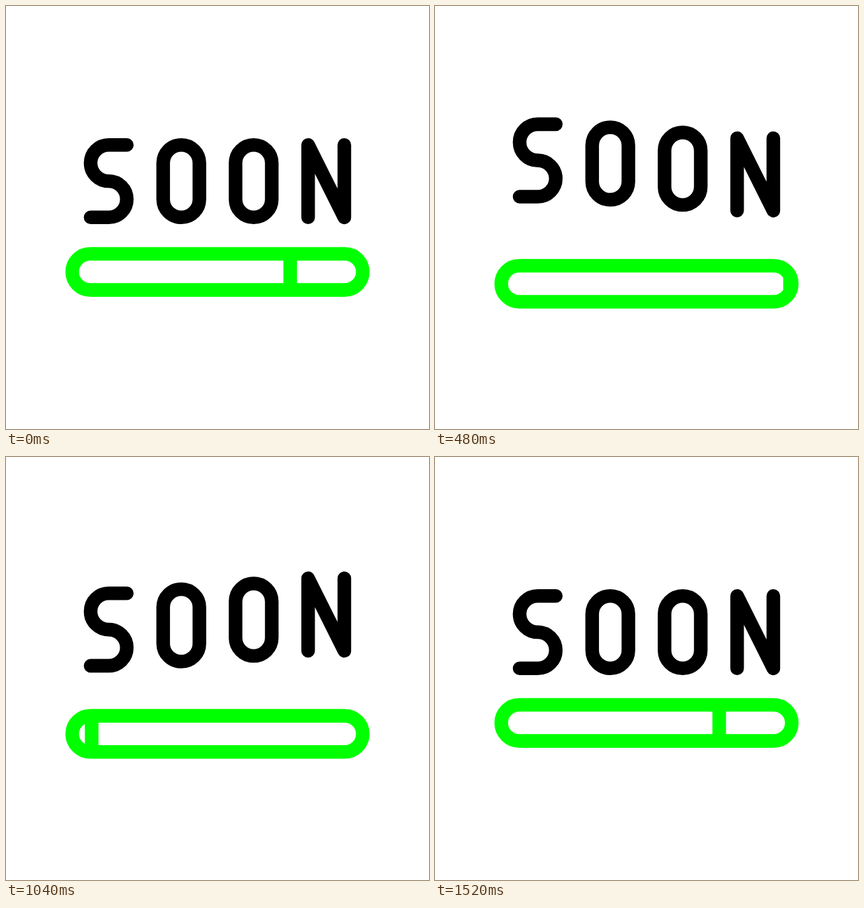
Animation of 640x640 px, one loop 1560 ms. Source, as an HTML page:

```html
<!DOCTYPE html>
<html lang="en">
<head>
<meta charset="utf-8">
<title>Soon</title>
<style>
  html, body { margin: 0; width: 100%; height: 100%; overflow: hidden; background: #fff; }
  svg { display: block; width: 100%; height: 100%; }
  path, rect, line { fill: none; stroke-width: 20.6; }
  .letter { stroke: #000; stroke-linecap: round; stroke-linejoin: round; }
  .green { stroke: #0f0; }
</style>
</head>
<body>
<svg viewBox="0 0 640 640" role="img" aria-label="SOON">
  <defs>
    <clipPath id="pill"><rect x="89.9" y="364.7" width="460.2" height="75.2" rx="37.6"/></clipPath>
  </defs>
  <path class="letter" d="M182.8 210.2H155.4a27.4 27.4 0 0 0 0 54.8a27.4 27.4 0 0 1 0 54.8H128"/>
  <rect class="letter" x="237.8" y="210.2" width="54.8" height="109.6" rx="27.4"/>
  <rect class="letter" x="347.3" y="210.2" width="54.8" height="109.6" rx="27.4"/>
  <path class="letter" d="M457.1 319.8V210.2L511.9 319.8V210.2"/>
  <g id="bar">
    <rect class="green" x="100.2" y="375" width="439.6" height="54.6" rx="27.3"/>
    <g clip-path="url(#pill)"><line id="mark" class="green" y1="375" y2="429.6"/></g>
  </g>
</svg>
<script>
  const LOOP = 1560, STEP = 40;
  const letters = document.querySelectorAll('.letter');
  const bar = document.getElementById('bar');
  const mark = document.getElementById('mark');

  const clamp = p => Math.min(1, Math.max(0, p));

  function ease(p) {
    const a = p * p, b = (1 - p) * (1 - p);
    return a / (a + b);
  }

  // Out and back: 0 to 1 in `half` ms, then down again
  function swing(t, start, half) {
    const p = clamp((t - start) / (2 * half));
    return ease(1 - Math.abs(2 * p - 1));
  }

  // The mark speeds out at the right end and slows in from the left
  function markX(t) {
    if (t < 760) return 430 + 110 * clamp(t / 485) ** 2.52;
    return 430 - 330 * clamp((1520 - t) / 505) ** 1.853;
  }

  function shiftY(el, y) {
    el.setAttribute('transform', `translate(0 ${y.toFixed(2)})`);
  }

  function draw(t) {
    letters.forEach((el, i) => shiftY(el, -33.3 * swing(t, i * 80, 600)));
    shiftY(bar, 25 * swing(t, 50, 700));
    const x = markX(t).toFixed(2);
    mark.setAttribute('x1', x);
    mark.setAttribute('x2', x);
  }

  const begin = performance.now();
  function tick() {
    const t = (performance.now() - begin) % LOOP;
    draw(Math.floor(t / STEP) * STEP);
    requestAnimationFrame(tick);
  }
  tick();
</script>
</body>
</html>
```
